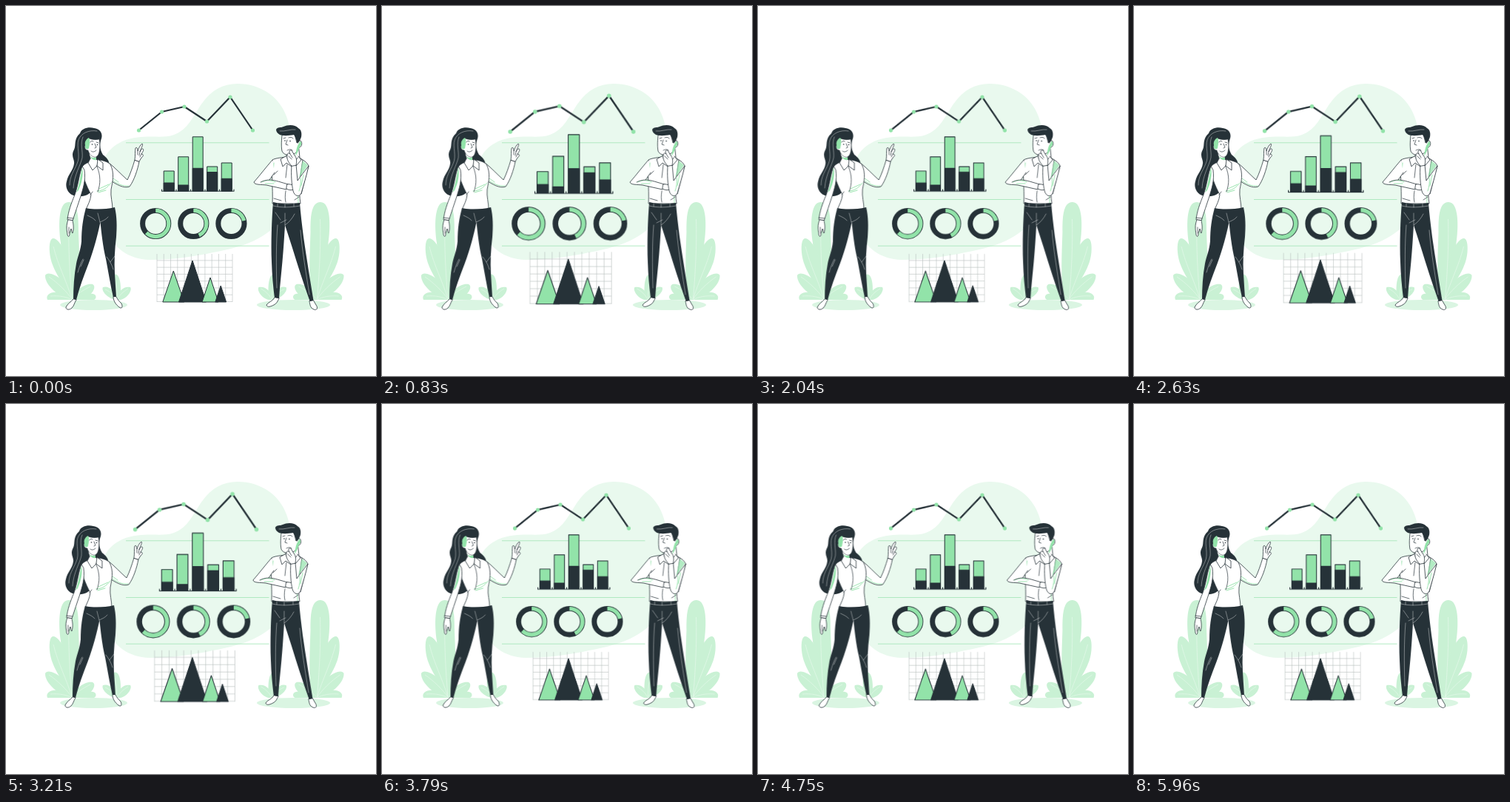
An HTML page that plays this animation: 500 by 500 pixels, repeating every 6 s.

```html
<!DOCTYPE html>
<html lang="en">
<head>
<meta charset="utf-8">
<title>Data presentation</title>
<style>
  html, body { margin: 0; width: 100%; height: 100%; overflow: hidden; background: #fff; }
  svg { display: block; width: 100%; height: 100%; }
  .dark { fill: #263238; }
  .mint { fill: #92e3a9; }
  .leaf { fill: #c9f1d4; }
  .vein { fill: none; stroke: #e4f8ea; stroke-width: .7; }
  .skin { fill: #fff; stroke: #263238; stroke-width: .8; stroke-linejoin: round; stroke-linecap: round; }
  .ink { fill: none; stroke: #263238; stroke-width: .7; stroke-linecap: round; stroke-linejoin: round; }
  .hatch { fill: none; stroke: #92e3a9; stroke-width: .9; stroke-linecap: round; }
  .seam { fill: none; stroke: #fff; stroke-width: .5; stroke-linecap: round; opacity: .8; }
  .edge { stroke: #263238; stroke-width: 1; stroke-linejoin: round; }
  .chart { animation: beat 6s linear infinite; }
  .person { animation: sway 6s linear infinite; }
  #line { transform-origin: 256.5px 145.3px; }
  #bars { transform-origin: 259.3px 213.7px; }
  #rings { transform-origin: 253.4px 294px; }
  #peaks { transform-origin: 255px 367.5px; }
  @keyframes beat {
    0%, 30%, 40%, 60%, 100% { transform: scale(1); }
    10%, 50% { transform: scale(1.1); }
  }
  @keyframes sway {
    0%, 100% { transform: translateX(0); }
    10%, 90% { transform: translateX(-1px); }
    20%, 80% { transform: translateX(2px); }
    30%, 50%, 70% { transform: translateX(-4px); }
    40%, 60% { transform: translateX(4px); }
  }
</style>
</head>
<body>
<svg viewBox="0 0 500 500">
  <defs>
    <g id="plant">
      <path class="leaf" d="M78 397C75 370 76 345 74 320C71 300 70 265 84.500 265C98 265 98 288 98 305C99 335 101 370 96 397Z"/>
      <path class="leaf" d="M88 397C80 376 61 358 59 333C58 321 60 314 64 314C72 315 80 330 84 348C88 365 92 380 92 397Z"/>
      <path class="leaf" d="M88 397C72 394 52 377 53 364C55 358 69 363 77 372C84 380 88 388 90 397Z"/>
      <path class="leaf" d="M90 397H56C53 391 60 386 69 387C78 388 86 392 90 397Z"/>
      <path class="leaf" d="M90 397C92 385 107 374 117 376C123 379 117 391 103 397Z"/>
      <path class="leaf" d="M98 397C103 390 115 387 120 390C123 393 121 396 119 397Z"/>
      <path class="vein" d="M85 288C84 325 86 360 89 396M64 325C70 350 82 372 89 396M58 366C70 374 82 386 89 396M60 392C72 391 82 393 89 397M114 379C104 384 95 390 90 396"/>
      <path class="leaf" d="M148 397C141 388 139 372 146 363C153 360 157 375 154 397Z"/>
      <path class="leaf" d="M150 397C150 386 159 378 168 380C171 384 164 395 155 397Z"/>
      <path class="leaf" d="M149 397C138 396 128 385 131 380C139 377 148 386 152 397Z"/>
      <path class="vein" d="M147 370C150 380 150 390 150 396M165 382C158 386 153 391 151 396M134 383C141 386 147 391 150 396"/>
    </g>
  </defs>

  <path fill="#e9f9ee" d="M313 105C344 105 372 123 381 155C386 174 388 190 395 212C404 240 390 273 367 294C346 317 318 326 280 333C252 339 225 343 194 343C165 342 145 327 136 302C126 276 123 250 127 225C131 198 148 181 178 177.500C199 175 213 179 227 174C246 167 252 150 264.500 132C277 114 293 105 313 105Z"/>
  <path fill="none" stroke="#a9e8bb" stroke-width=".9" d="M162 184.8H355.5M162 261.5H355.5M162 324.2H355.5"/>

  <ellipse cx="118.500" cy="404" rx="45.500" ry="7" fill="#daf5e2"/>
  <ellipse cx="388.500" cy="404" rx="49.500" ry="7" fill="#daf5e2"/>
  <use href="#plant"/>
  <use href="#plant" transform="matrix(-1 0 0 1 509.500 0)"/>

  <g id="line" class="chart">
    <path fill="none" stroke="#263238" stroke-width="2.2" stroke-linejoin="round" d="M179.500 168L210.500 143L241 136L271.500 156L303 123L333.500 168"/>
  </g>
  <g id="bars" class="chart">
    <path class="ink" style="stroke-width:1.100" d="M210.500 248V250.300H308V248M230 248V250M249.500 248V250M269 248V250M288.500 248V250"/>
  </g>
  <g id="rings" class="chart"></g>
  <g id="peaks" class="chart"></g>

  <g class="person">
    <path class="dark" d="M100 172C102 165 112 163 119 165C127 166 131 172 129 179C126 187 127 195 131 201C136 205 140 209 139 214L110 214C116 224 119 237 117 247C114 255 106 258 97 257C86 257 79 247 82 237C84 227 91 222 92 213C93 207 87 203 92 194C95 188 91 180 100 172Z"/>
    <path class="seam" d="M123 169C112 167 101 172 98 181C95 190 101 203 96 213C92 223 86 230 86 242M104 177C100 186 104 196 103 205C101 215 92 228 91 246"/>

    <path class="skin" d="M112 199L114 206L111 216L122 224L128 213L122 207L122 202Z"/>
    <path class="mint" d="M114 203C117 206 120 205 122 204L122 208C118 209 115 206 114 203Z"/>
    <path class="skin" style="stroke-width:.5" d="M112 179C117 181 122 181 126 180C127 186 127 192 126 197C125 202 122 205 119 204C115 203 112 199 111 195C107 195 105 190 108 187C110 187 111 183 112 179Z"/>
    <path class="mint" d="M112 178C114 181 113 187 112 192C110 195 106 193 107 188C106 184 108 180 112 178Z"/>
    <path class="ink" d="M120 186L122 191L120 192M115 196C117 198 120 197 122 195M114 184C115 182 116 182 118 183M122 184L125 185"/>
    <circle class="dark" cx="116.500" cy="187" r=".8"/><circle class="dark" cx="123.500" cy="187.500" r=".8"/>

    <path class="skin" d="M138 211C148 219 156 228 164 235C168 227 171 218 174 208L180 210C178 221 173 236 167 244C159 247 149 241 140 235Z"/>
    <path class="hatch" d="M143 235C151 241 159 244 166 243M145 233L152 238"/>
    <path class="skin" d="M174 208C175 202 174 197 175 192C177 190 178 193 178 196C179 193 181 188 184 186C186 187 182 193 181 197C182 195 184 192 185 193C187 195 184 198 183 200C186 200 186 203 183 205L180 210Z"/>
    <path class="ink" d="M178 196L178 201M181 197L180 202M183 200L181 204"/>

    <path class="skin" d="M112 211C107 213 104 215 102 219C104 231 108 242 115 255C114 263 111 268 108 275H144C144 265 141 258 142 248C144 237 147 226 141 214C137 210 131 209 127 208L122 217L114 207Z"/>
    <path class="hatch" d="M123 250C130 250 137 246 142 239M126 247L139 241M125 252L135 249"/>
    <path class="skin" d="M114 206L111 212L117 222L123 216L124 207L131 212L131 222L123 216"/>
    <path class="ink" d="M123 217C128 229 128 240 124 251M114 255L117 251"/>
    <path class="skin" d="M103 217C99 226 98 241 93 255C88 267 84 278 83 289L90 290C94 279 97 268 101 257C104 247 108 236 106 222Z"/>
    <path class="mint" d="M103 218C101 228 99 242 95 252L98 249C102 240 105 229 103 218Z"/>
    <path class="skin" d="M84 289C81 296 82 302 83 309C84 313 86 312 86 307L88 301C89 304 89 307 90 307C92 300 91 295 90 290Z"/>
    <path class="ink" d="M85 299V307M83 286L91 287"/>

    <path class="dark" d="M108 273C119 276 134 275 147 272C150 285 150 298 149 312C147 328 146 345 147 362L149 394H145C141 376 138 358 135 342C131 325 129 307 127.500 292C124 309 119 328 112 347C105 365 99 381 95 397H91C91 380 92 364 95 348C97 338 101 330 102 318C102 301 104 287 108 273Z"/>
    <path class="seam" d="M110 283C114 285 119 287 121 290M127 292C131 290 135 289 138 285M127 292L124 280M104 342C101 347 99 353 97 360M136 339C140 344 143 349 145 356M105 343L101 352M147 338L141 346"/>
    <path class="skin" d="M91 396C88 400 83 402 81 407C81 411 86 411 89 408C92 405 92 402 95 397Z"/>
    <path class="skin" d="M145 393C145 399 149 404 153 407C157 410 158 406 156 402C153 399 151 397 149 393Z"/>
  </g>

  <g class="person">
    <path class="skin" d="M380 197L378 207L386 218L397 205L395 185Z"/>
    <path class="skin" d="M399 207C404 209 407 212 409 216C405 229 402 243 399 254L390 250L392 220Z"/>
    <path class="skin" d="M378 204C370 205 363 206 360 208C358 220 361 246 360 267L398 267C395 250 398 227 401 208L395 204L386 216Z"/>
    <path class="hatch" d="M394 254C395 259 395 262 395 266M362 212L361 226"/>
    <path class="skin" d="M378 203L371 207L374 217L379 212L386 217M395 203L399 208L392 216"/>
    <path class="ink" d="M380 214L378 232M378 250C377 256 377 261 378 265M362 260L372 263M396 258L390 262"/>

    <path class="skin" d="M373 175C372 184 372 191 373 196C375 201 381 202 387 201C392 199 395 195 396 191C400 191 401 184 398 182C395 181 394 183 393 185L390 173Z"/>
    <path class="mint" d="M397 183C400 182 400 188 397 190C395 196 393 200 391 203C392 196 393 190 395 187Z"/>
    <path class="dark" d="M365 167C367 163 371 165 375 163C381 160 391 160 395 165C399 167 400 172 399 177L397 182L394 186C392 182 392 178 389 174C383 175 376 176 370 174C367 172 365 170 365 167Z"/>
    <path class="seam" d="M370 169C377 170 385 166 391 167"/>
    <path class="ink" d="M380 181L378 187L381 188M380 195C382 194 385 193 387 195M375 179L378 178M382 178C384 177 386 177 388 179"/>
    <circle class="dark" cx="377" cy="182" r=".8"/><circle class="dark" cx="384" cy="182.500" r=".8"/>

    <path class="skin" d="M360 208C352 217 343 229 335 238C336 242 344 241 352 242L379 248L382 241C373 239 364 235 356 235L363 225"/>
    <path class="hatch" d="M345 238C352 235 357 235 364 238M350 240L362 240"/>
    <path class="ink" d="M356 235C352 235 348 236 344 238M362 228L367 223"/>
    <path class="skin" d="M380 241C384 240 389 242 391 246C388 250 382 249 379 247Z"/>
    <path class="skin" d="M386 215C385 228 386 241 388 250C390 257 396 259 399 253C402 242 406 230 409 216C403 224 398 230 394 236L392 214Z"/>
    <path class="mint" opacity=".7" d="M401 209L408 215C404 221 400 227 396 232C398 224 399 216 401 209Z"/>
    <path class="hatch" d="M398 232C399 238 398 244 396 250M402 228L399 243"/>
    <path class="skin" d="M386 216C382 212 379 207 380 202C380 199 382 198 384 200C382 197 383 194 386 195L390 202C393 205 393 210 392 215Z"/>
    <path class="ink" d="M384 200L387 205M382 203L386 207"/>

    <path class="dark" d="M361 265C372 268 386 268 397 266C398 280 400 296 402 312C406 340 411 370 415.500 398L411 400C402 375 394 350 387 327L377 296C376 312 375 329 373.500 345C372 362 370 379 369 395H363C361 379 359.500 363 359 346C358 320 359 289 361 265Z"/>
    <path class="seam" d="M361 270C373 273 386 272 397 270M367 267V271M377 268V272M389 267V271M364 279L371 289M377 296C382 293 387 287 390 281M377 296L377 280M398 303C400 330 406 364 410 390M367 296C365 320 365 350 366 381M371 293L379 289"/>
    <path class="skin" d="M363 394C361 399 354 400 352 404C353 408 358 406 362 404C366 402 367 399 369 395Z"/>
    <path class="skin" d="M410 399C411 404 411 408 416 410C420 412 422 408 419 404L415.500 398Z"/>
  </g>
</svg>
<script>
  function add(parent, tag, attrs) {
    const el = document.createElementNS('http://www.w3.org/2000/svg', tag);
    for (const key in attrs) el.setAttribute(key, attrs[key]);
    document.getElementById(parent).append(el);
  }

  for (const [cx, cy] of [[179.5, 168], [210.5, 143], [241, 136], [271.5, 156], [303, 123], [333.5, 168]])
    add('line', 'circle', { cx, cy, r: 2.6, class: 'mint' });

  // Top of each bar and the height where its dark part starts
  [[223, 239], [203.8, 242], [176.8, 219.3], [217, 224.5], [212, 233.3]].forEach(([top, split], i) => {
    const x = 213.2 + i * 19.5;
    add('bars', 'rect', { x, y: top, width: 14, height: 250 - top, class: 'mint edge' });
    add('bars', 'rect', { x, y: split, width: 14, height: 250 - split, class: 'dark edge' });
  });

  [225, 155, 77].forEach((angle, i) => {
    const ring = { cx: 202.2 + i * 51.1, cy: 294, r: 17.6, fill: 'none' };
    add('rings', 'circle', { ...ring, stroke: '#263238', 'stroke-width': 7 });
    add('rings', 'circle', {
      ...ring, stroke: '#92e3a9', 'stroke-width': 5.2, pathLength: 360,
      'stroke-dasharray': `${angle} ${360 - angle}`,
      transform: `rotate(-90 ${ring.cx} 294)`
    });
  });

  let grid = '';
  for (let i = 0; i < 12; i++) grid += `M${204 + i * 9.27} 335V400`;
  for (let i = 0; i < 7; i++) grid += `M204 ${399.5 - i * 9.27}H306`;
  add('peaks', 'path', { d: grid, fill: 'none', stroke: '#b9c0bf', 'stroke-width': .6 });

  for (const [x, y, half, tone] of [[226.3, 358, 14.5, 'mint'], [252, 344, 18.5, 'dark'], [276, 367, 11, 'mint'], [290.2, 378, 7.4, 'dark']])
    add('peaks', 'path', { d: `M${x - half} 400L${x} ${y}L${x + half} 400Z`, class: tone + ' edge' });
</script>
</body>
</html>
```
